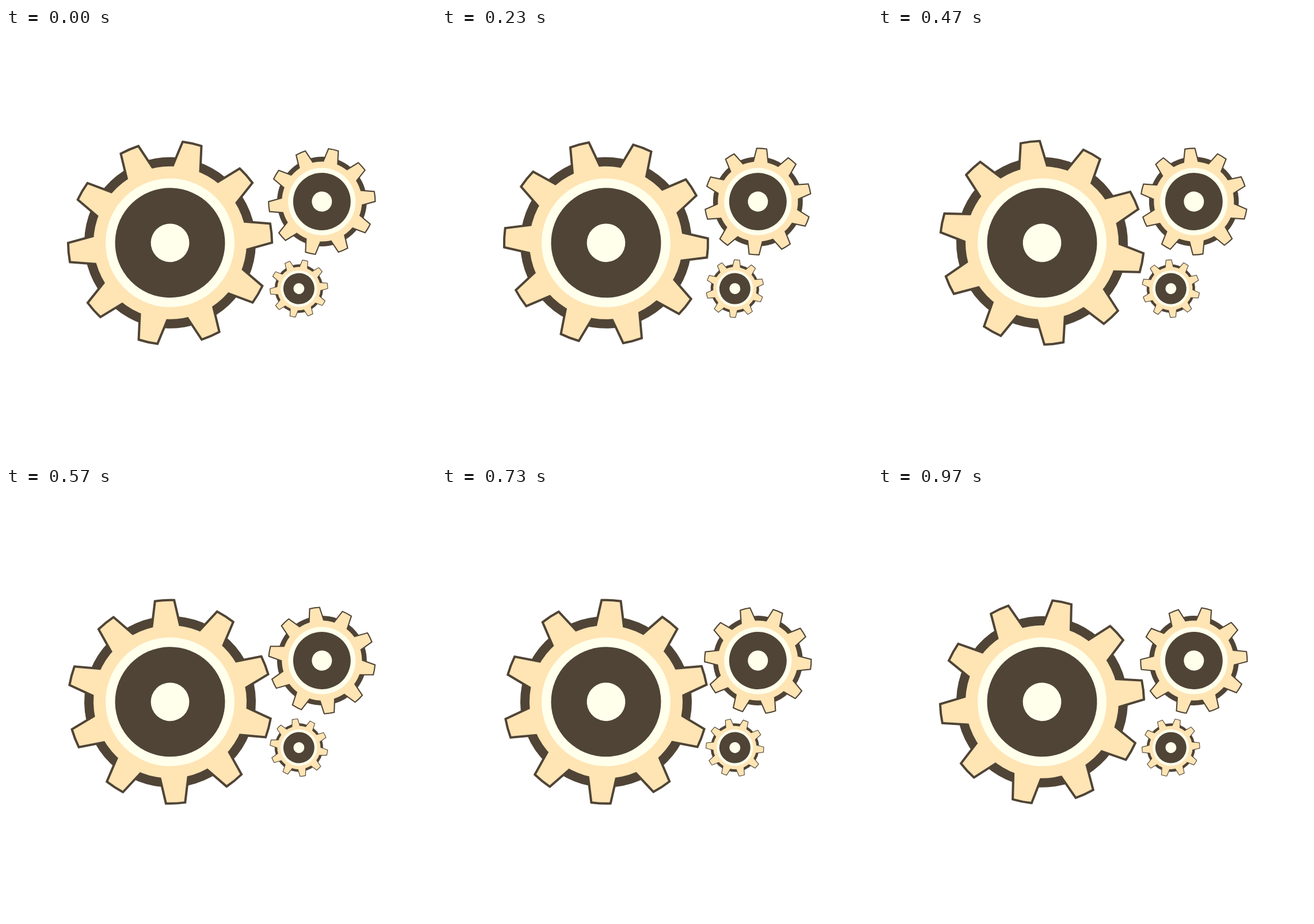
Write an HTML page with a canvas that moves like this. It is 747x750 px and loops after 1010 ms.

```html
<!DOCTYPE html>
<html lang="en">
<head>
<meta charset="utf-8">
<title>Gears</title>
<style>
  html, body { margin: 0; height: 100%; overflow: hidden; background: #fff; }
  canvas { display: block; }
</style>
</head>
<body>
<canvas id="stage" width="747" height="750"></canvas>
<script>
const ctx = document.getElementById("stage").getContext("2d");
const DARK = "#4f4436", PEACH = "#ffe4b4", CREAM = "#ffffec";
const LOOP = 1010, STEPS = 30, TEETH = 10, PITCH = 360 / TEETH, START = 12.5;

const gears = [
  { x: 285, y: 373.8, scale: 1, dir: 1 },
  { x: 548.8, y: 302, scale: 0.523, dir: -1 },
  { x: 508.8, y: 453.5, scale: 0.283, dir: -1 }
];

// All teeth of the largest gear, centred on 0,0, with slightly curved tips
const teeth = new Path2D();
for (let i = 0; i < TEETH; i++) {
  const tooth = new Path2D("M-23.7 -125L-15 -174.4A175 175 0 0 1 15 -174.4L23.7 -125Z");
  teeth.addPath(tooth, new DOMMatrix().rotate(i * PITCH));
}

function disc(radius, color) {
  ctx.fillStyle = color;
  ctx.beginPath();
  ctx.arc(0, 0, radius, 0, Math.PI * 2);
  ctx.fill();
}

function drawGear({ x, y, scale, dir }, turn) {
  ctx.save();
  ctx.translate(x, y);
  ctx.scale(scale, scale);
  ctx.rotate((START + dir * turn) * Math.PI / 180);
  disc(149, DARK);
  ctx.strokeStyle = DARK;
  ctx.lineWidth = 8;
  ctx.stroke(teeth);
  disc(133, PEACH);
  ctx.fill(teeth);
  disc(112, CREAM);
  disc(95.5, DARK);
  disc(33.4, CREAM);
  ctx.restore();
}

function draw(now) {
  // Thirty steps a second, on a 10 ms clock; the last step lasts a little longer
  const t = Math.floor(now % LOOP / 10) * 10;
  const step = Math.min(STEPS - 1, Math.floor((t + 4) * 0.03));
  ctx.clearRect(0, 0, 747, 750);
  for (const gear of gears) drawGear(gear, step * PITCH / STEPS);
}

let start;
function tick(now) {
  start ??= now;
  draw(now - start);
  requestAnimationFrame(tick);
}
draw(0);
requestAnimationFrame(tick);
</script>
</body>
</html>
```
